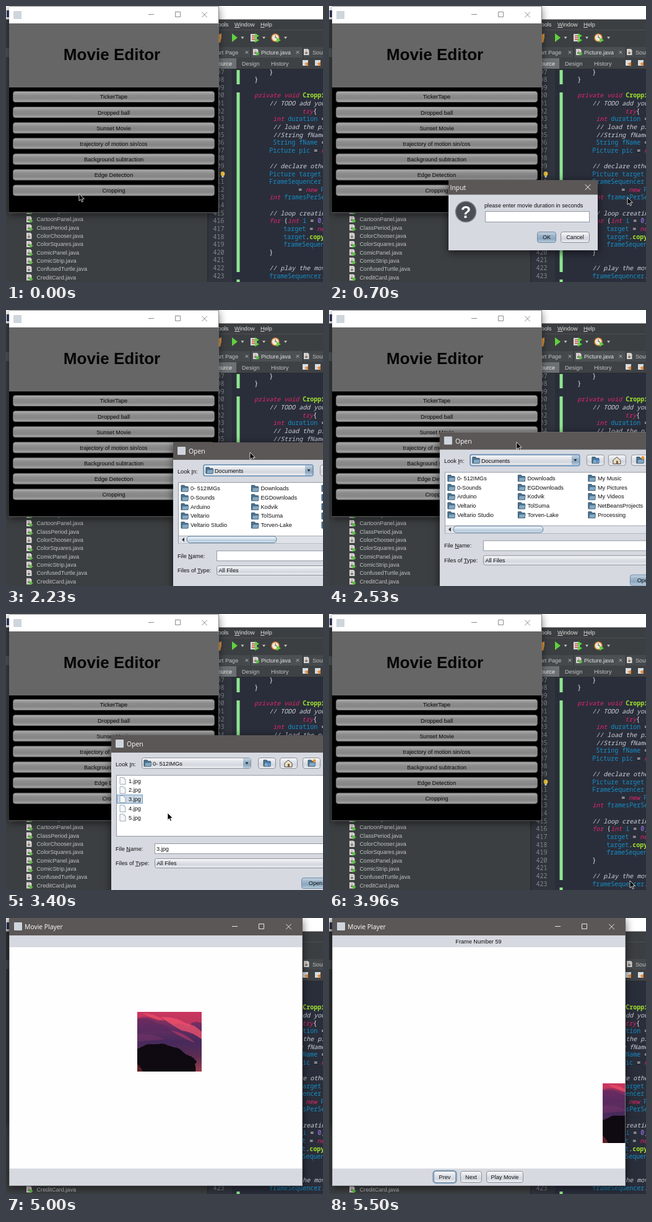
Write an HTML page that moves like this. It is 512x444 px and loops after 5.7 s.

```html
<!DOCTYPE html>
<html lang="en">
<head>
<meta charset="utf-8">
<title>Movie Editor</title>
<style>
  html, body { margin: 0; width: 100%; height: 100%; overflow: hidden; background: #3c3f41; }
  svg { display: block; width: 512px; height: 444px; }
  text { font: 9.17px "Liberation Sans", Arial, sans-serif; white-space: pre; }
  .caption { font: 10.4px "Open Sans", sans-serif; }
  .code { font: 10px "Noto Sans Mono", monospace; }
  .heading { font-size: 26.1px; font-weight: bold; }
  .help { font-size: 27px; font-weight: bold; }
  .mid { text-anchor: middle; }
  .u { text-decoration: underline; }
  .k { fill: #e8256a; font-style: italic; }
  .c { fill: #cfd2d6; font-style: italic; }
  .v { fill: #158fc6; }
  .f { fill: #a2e32c; font-weight: bold; }
  .n { fill: #a77cf0; }
  .w { fill: #ececea; }
  .shadow { filter: drop-shadow(0 3px 7px rgba(0, 0, 0, .6)); }
</style>
</head>
<body>
<svg id="stage" viewBox="0 0 512 444"></svg>
<script>
const LOOP = 5700;
const PANEL = '#d6d9e0', CAPTION = '#5b5756';

// Drawing helpers
const rect = (x, y, w, h, fill, more = '') =>
  `<rect x="${x}" y="${y}" width="${w}" height="${h}" fill="${fill}" ${more}/>`;
const path = (d, fill, more = '') => `<path d="${d}" fill="${fill}" ${more}/>`;
const line = (d, color, width = 1) => path(d, 'none', `stroke="${color}" stroke-width="${width}"`);
const mnemonic = s => s.replace(/_(.)/, '<tspan class="u">$1</tspan>');
const text = (x, y, s, fill = '#111', cls = '') =>
  `<text x="${x}" y="${y}" fill="${fill}" class="${cls}">${mnemonic(s)}</text>`;
const group = (id, body, more = '') => `<g id="${id}" ${more}>${body}</g>`;
const logo = (x, y) => rect(x, y, 13, 13, '#cfd5dc', 'rx="1"');
const button = (x, y, w, h, label, fill = 'url(#light)', color = '#111', edge = '#8b9098') =>
  rect(x + .5, y + .5, w - 1, h - 1, fill, `rx="3.5" stroke="${edge}"`) +
  text(x + w / 2, y + h / 2 + 3.4, label, color, 'mid');
const field = (x, y, w, h) => rect(x + .5, y + .5, w - 1, h - 1, '#fff', 'stroke="#9499a2"');
const cross = (x, y, r, color) => line(`M${x - r} ${y - r}l${2 * r} ${2 * r}m0 ${-2 * r}l${-2 * r} ${2 * r}`, color);
const controls = (xs, color) =>
  line(`M${xs[0] - 4.5} 13.5h9M${xs[1] - 4} 9.5h8v8h-8z`, color) + cross(xs[2], 14, 4.3, color);
const down = (x, y, color) => path(`M${x - 2.5} ${y - 1.5}h5l-2.5 3.5z`, color);
const folder = (x, y) =>
  path(`M${x} ${y}h5l1.5 2h4.5v8h-11z`, '#4b7391', 'stroke="#2b4a62" stroke-width=".9"') +
  path(`M${x + 2} ${y + 4}h10l-1.5 6h-9.5z`, '#86a9c2', 'stroke="#3f627c" stroke-width=".6"');
const page = (x, y) =>
  path(`M${x} ${y}h6l3 3v8h-9z`, '#f4f7fa', 'stroke="#8493a3" stroke-width=".8"') +
  path(`M${x + 6} ${y}v3h3z`, '#b9c8d6');
const source = (x, y, runs) =>
  path(`M${x} ${y}h6.5l2 2v8h-8.5z`, '#d3d6d8') +
  path(`M${x + 2} ${y + 5}h4v3h-4z`, '#8d7a6c') + line(`M${x + 4} ${y + 1.5}v3`, '#d98b45') +
  (runs ? path(`M${x + 5} ${y + 4.5}l6 3.3-6 3.3z`, '#57c33a') : '');

const gradient = (id, ...stops) =>
  `<linearGradient id="${id}" x2="0" y2="1">` +
  stops.map((c, i) => `<stop offset="${i / (stops.length - 1)}" stop-color="${c}"/>`).join('') +
  '</linearGradient>';

function defs() {
  return '<defs>' +
    gradient('steel', '#b0b0b0', '#8d8d8d', '#858585', '#a8a8a8') +
    gradient('light', '#fbfbfc', '#e2e5ea', '#d3d7de', '#f0f2f5') +
    gradient('blue', '#c8d6e3', '#9db5ca', '#8ba7bf', '#bdd0df') +
    gradient('thumb', '#f2f6fa', '#dbe6ef', '#b4cadb', '#e4eef5') +
    gradient('pressed', '#3f5e7d', '#4b6f93', '#5d83a6', '#7a9cb9') +
    gradient('sky', '#a8305c', '#6a2e62', '#462a5c', '#5c2c52', '#96404e') +
    '<clipPath id="canvas"><path d="M5 47h474v356H5z"/></clipPath>' +
    '<clipPath id="photo"><path d="M0 0h104v96H0z"/></clipPath></defs>';
}

function codeArea() {
  const top = 109.6, pitch = 12.615;
  const lines = [
    [0, 426, 'w}'],
    [1, 402, 'w}'],
    [3, 402, 'kprivate void ', 'fCropping'],
    [4, 426, 'c// TODO add your'],
    [5, 479, 'ktry', 'w{'],
    [6, 432, 'kint ', 'vduration ', 'w='],
    [7, 432, 'c// load the picture'],
    [8, 432, 'c//String fName'],
    [9, 432, 'vString fName ', 'w='],
    [10, 426, 'vPicture pic ', 'w= ', 'knew'],
    [12, 426, 'c// declare other'],
    [13, 426, 'vPicture target'],
    [14, 426, 'vFrameSequencer'],
    [15, 473, 'w= ', 'knew ', 'vF'],
    [16, 426, 'kint ', 'vframesPerSec'],
    [18, 426, 'c// loop creating'],
    [19, 426, 'kfor ', 'w(', 'kint ', 'vi ', 'w= ', 'n0', 'w;'],
    [20, 449, 'vtarget ', 'w= ', 'knew'],
    [21, 449, 'vtarget', 'w.', 'fcopy'],
    [22, 449, 'vframeSequencer'],
    [23, 426, 'w}'],
    [25, 426, 'c// play the movie'],
    [26, 426, 'vframeSequencer', 'w.']
  ];
  let out = rect(327, 102, 185, 342, '#2a2e3b') + rect(327, 102, 38, 342, '#30343d');
  for (let i = 0; i < 27; i++) out += text(334.5, top + i * pitch, `${397 + i}`, '#83868c', 'code');
  for (const [row, x, ...parts] of lines) {
    const spans = parts.map(p => `<tspan class="${p[0]}">${p.slice(1)}</tspan>`).join('');
    out += text(x - .8, top + row * pitch, spans, '#fff', 'code');
  }
  return out + rect(372.5, 103, 5, 23, '#8fe78f') + rect(372.5, 139, 5, 289, '#8fe78f') +
    rect(372.5, 440, 5, 4, '#8fe78f') +
    `<circle cx="350" cy="270" r="3.4" fill="#f4c93c"/>` + rect(348.5, 273, 3, 3, '#c9ced4');
}

function ide() {
  const grey = '#c0c2c4';
  const files = ['Cartoon', 'CartoonPanel', 'ClassPeriod', 'ColorChooser', 'ColorSquares',
    'ComicPanel', 'ComicStrip', 'ConfusedTurtle', 'CreditCard'];
  let out = rect(0, 0, 512, 444, '#3c3f41') + rect(0, 0, 512, 21.5, '#fff') +
    rect(1, 7, 4, 11, '#39406b') + rect(0, 68, 5, 14, '#55595c');
  files.forEach((name, i) => {
    const y = 329.6 + i * 13.35;
    out += source(33, y - 5, i !== 3 && i !== 7) + text(49.5, y + 3.2, name + '.java', grey);
  });
  out += rect(325, 66, 2, 378, '#2b2d2f') +
    text(338, 33, 'Tools', '#ddd') + text(369, 33, '_Window', '#ddd') + text(411, 33, '_Help', '#ddd') +
    line('M327 38.5h185', '#4b4e50') +
    path('M343 46l5-2v7l-2 8h-3z', '#d9913f') +
    path('M365 44l9 7-9 7z', '#5fd23f') +
    rect(395, 45, 10, 12, '#d8dcdf') + line('M397 48h6M397 51h5M397 54h6', '#cf4a3e', 1.4) +
    path('M402 44l7 4-7 4zM402 51l7 4-7 4z', '#5fd23f') +
    '<circle cx="435" cy="51" r="6" fill="#f1e7d8" stroke="#d98632" stroke-width="1.6"/>' +
    line('M435 47v4h3', '#555') + path('M437 51l7 4-7 4z', '#5fd23f') +
    [382, 416.5, 451.5].map(x => down(x, 51, '#c6c8ca')).join('') +
    rect(327, 66, 185, 17, '#45494b') + rect(395, 66, 84, 17, '#4c5053') + line('M395.5 66v17M479.5 66v17', '#2f3133') +
    text(332, 78, 'Start Page', grey) + cross(389, 74.5, 2.3, grey) +
    source(399, 69, true) + text(412, 78, 'Picture.java', '#e2e4e5') + cross(471, 74.5, 2.3, grey) +
    source(481, 69, false) + text(495, 78, 'Source.java', grey) +
    rect(327, 83, 185, 19, '#3f4244') + rect(333, 84, 39, 17, '#6c7073') +
    text(336, 96, 'Source', '#eee') + text(381, 96, 'Design', grey) + text(428, 96, 'History', grey) +
    [479, 499].map(x => rect(x, 87, 9, 9, '#d9dde0') + path(`M${x + 9} ${90}l-6 3 6 4z`, '#e08a3c')).join('') +
    line('M327 101.5h185', '#27292b');
  return out + codeArea();
}

function mainWindow() {
  const items = ['TickerTape', 'Dropped ball', 'Sunset Movie', 'trajectory of motion sin/cos',
    'Background subtraction', 'Edge Detection', 'Cropping'];
  return rect(5, 0, 338, 332, '#000', 'class="shadow"') + rect(5, 0, 338, 28, '#fff') +
    logo(12, 8) + controls([234.5, 277.5, 320.5], '#8c8c8c') +
    rect(5, 28, 338, 103, '#666') + text(171, 87, 'Movie Editor', '#050505', 'heading mid') +
    items.map((s, i) => button(11, 137 + i * 25.1, 326, 18, s, 'url(#steel)', '#0a0a0a', '#6a6a6a')).join('') +
    line('M5 .5h338.5v332H4.5', '#777', .8);
}

function inputDialog() {
  return rect(193, 280, 241, 113, PANEL, 'class="shadow"') + rect(193, 280, 241, 23.5, CAPTION) +
    text(195.5, 296, 'Input', '#fff', 'caption') + cross(418, 291.5, 4.3, '#fff') +
    '<circle cx="221" cy="331" r="16.5" fill="#4a4f56" stroke="#7d838b" stroke-width="1.5"/>' +
    text(221, 341, '?', '#fff', 'help mid') +
    text(251, 324, 'please enter movie duration in seconds') + field(252, 330, 169, 18) +
    group('typed', text(255, 343, '2')) +
    button(336, 363, 31, 18, 'OK', 'url(#blue)', '#111', '#6f8aa5') +
    group('okDown', button(336, 363, 31, 18, 'OK', 'url(#pressed)', '#e9f1f8', '#2f4a66')) +
    button(374, 363, 47, 18, 'Cancel');
}

// Drawn with its corner at 0,0
function openDialog() {
  const columns = [
    ['0- 512IMGs', '0-Sounds', 'Arduino', 'Veltario', 'Veltario Studio'],
    ['Downloads', 'EGDownloads', 'Kodvik', 'TolSuma', 'Torven-Lake'],
    ['My Music', 'My Pictures', 'My Videos', 'NetBeansProjects', 'Processing']
  ];
  const row = i => 74 + i * 14.75;
  const pick = (y, w) => rect(9.5, y - 7, w, 13.5, '#cbd9e6', 'stroke="#6f97c0"');
  const folders = columns.map((names, c) => names.map((s, i) =>
    folder(13 + c * 113.5, row(i) - 5) + text(28 + c * 113.5, row(i) + 3.2, s)).join('')).join('');
  const files = [1, 2, 3, 4, 5].map((n, i) => page(14, row(i) - 6) + text(28, row(i) + 2.6, n + '.jpg')).join('');
  return rect(0, 0, 406, 256, PANEL, 'class="shadow"') + rect(0, 0, 406, 28, CAPTION) +
    logo(7, 7) + text(25, 18, 'Open', '#fff', 'caption') +
    text(7, 49.5, 'Look _In:') +
    rect(49.5, 36.5, 176, 17, 'url(#light)', 'rx="3" stroke="#8b9098"') +
    rect(213, 37, 12, 16, 'url(#blue)') + down(219, 45, '#222') + folder(53, 40) +
    group('focus', rect(49, 36, 177, 18, 'none', 'rx="3" stroke="#6d95bd" stroke-width="1.6"')) +
    group('docs', text(67, 49, 'Documents')) + group('imgs', text(67, 49, '0- 512IMGs')) +
    [237, 272, 309].map(x => button(x, 36, 29, 18, '')).join('') + folder(246, 40) +
    path('M254 50v-7m-2.5 2.5l2.5-3 2.5 3', 'none', 'stroke="#2e7fd0" stroke-width="1.5"') +
    path('M280 45l6-5 6 5v6h-12z', '#e9dfc5', 'stroke="#444"') + rect(285, 46, 3, 5, '#7b5a34') +
    folder(318, 40) + '<circle cx="328" cy="41" r="2.5" fill="#f0962e"/>' +
    rect(8.5, 64.5, 389, 98, '#fff', 'stroke="#9499a2"') +
    group('folderView', group('folderPick', pick(row(0), 67)) + folders +
      rect(9, 150, 388, 12.5, '#dfe2e8') + line('M9 150.5h388', '#a6abb3') +
      rect(22, 151, 145, 10.5, 'url(#thumb)', 'rx="5" stroke="#5d7f9f"') + path('M18 153v7l-4-3.5z', '#333')) +
    group('fileView', group('filePick', pick(row(2) - .5, 41)) + files) +
    text(7, 185.5, 'File _Name:') + field(70, 174, 328, 17) + group('fileName', text(73, 185.5, '3.jpg')) +
    text(7, 209, 'Files of _Type:') + rect(70.5, 198.5, 327, 15, 'url(#light)', 'rx="3" stroke="#8b9098"') +
    text(73.5, 209.3, 'All Files') +
    button(307, 229, 46, 18, 'Open', 'url(#blue)', '#111', '#6f8aa5') +
    group('openDown', button(307, 229, 46, 18, 'Open', 'url(#pressed)', '#e9f1f8', '#2f4a66'));
}

function picture() {
  let leaves = '';
  for (let i = 0; i < 26; i++) {
    const x = i * 3.7, y = 52 + ((x - 32) / 11.5) ** 2 * .95;
    leaves += `<circle cx="${x}" cy="${y + 2}" r="${2.6 + Math.sin(i * 5.3)}" fill="#0f0a12"/>`;
  }
  const cloud = (d, color, o) => path(d, color, `opacity="${o}"`);
  return group('photoArt', rect(0, 0, 104, 96, 'url(#sky)') +
    cloud('M0 0H104V18Q90 12 82 24Q70 16 58 20Q46 10 34 14Q18 4 0 10Z', '#d93a5e', .7) +
    cloud('M0 12Q18 8 32 18Q48 20 58 32Q36 28 0 34Z', '#54285f', .55) +
    cloud('M38 8Q62 8 78 18Q92 20 104 32V44Q88 32 72 30Q56 22 38 8Z', '#f2526c', .75) +
    cloud('M8 2Q28 2 44 14Q28 14 8 2Z', '#f2526c', .6) +
    cloud('M54 30Q74 32 94 50Q76 44 54 30Z', '#c83d66', .55) +
    cloud('M0 36Q24 34 44 44Q22 46 0 48Z', '#7c3468', .5) +
    path('M0 60Q14 51 34 52Q62 53 82 71Q97 82 94 96H0Z', '#0f0a12') + leaves +
    path('M0 84q5 4 9 12H0z', '#5a2026'), 'clip-path="url(#photo)"');
}

function player() {
  return rect(5, 0, 474, 431, PANEL, 'class="shadow"') + rect(5, 0, 474, 28, CAPTION) +
    logo(13, 7) + text(30, 18, 'Movie Player', '#fff', 'caption') + controls([369.5, 412.5, 456.5], '#e6e5e4') +
    rect(5, 47, 474, 356, '#fefefe') +
    `<g clip-path="url(#canvas)">${group('photoPos', picture())}</g>` +
    group('done', text(241.5, 41.3, 'Frame Number 59', '#111', 'mid') +
      rect(168, 406.5, 38, 20, 'none', 'rx="5" stroke="#6d95bd" stroke-width="1.5"') +
      button(169, 407, 36, 19, 'Prev') + button(212, 407, 35, 19, 'Next') + button(254, 407, 60, 19, 'Play Movie')) +
    line('M5.5 28v402.5h473v-402.5', '#8f9196', .7);
}

const stage = document.getElementById('stage');
stage.innerHTML = defs() + ide() + group('main', mainWindow()) + group('input', inputDialog()) +
  group('open', openDialog()) + group('player', player()) +
  group('cursor', path('M0 0V11.5L2.7 9 4.5 13.2 6.4 12.4 4.7 8.3H8.3Z', '#000', 'stroke="#fff" stroke-width=".8"'));

const el = {};
stage.querySelectorAll('g[id]').forEach(g => el[g.id] = g);

// Keys are [time, ...values], joined by straight lines
function track(keys, t) {
  const i = keys.findIndex(k => k[0] > t);
  if (i === 0) return keys[0].slice(1);
  if (i < 0) return keys[keys.length - 1].slice(1);
  const a = keys[i - 1], b = keys[i], p = (t - a[0]) / (b[0] - a[0]);
  return a.slice(1).map((v, j) => v + (b[j + 1] - v) * p);
}

const pointer = [
  [30, 118, 302], [130, 471, 326], [470, 471, 326], [660, 503, 312], [830, 414, 295],
  [1010, 414, 295], [1230, 245, 336], [1320, 245, 336], [1530, 350, 372],
  [2140, 350, 372], [2230, 394, 229], [2260, 394, 229], [2560, 294, 211], [2590, 294, 211],
  [2730, 228, 262], [3020, 228, 262], [3200, 206, 294], [3260, 206, 294],
  [3400, 261, 320], [3566, 470, 411], [3600, 486, 429]
];
const drag = [[2260, 270, 213], [2560, 170, 195]];
const inputFade = [[466, 0], [700, 1], [1600, 1], [1700, 0]];
const openFade = [[1700, 0], [1830, 1], [3630, 1], [3766, 0]];

const show = (id, on) => el[id].style.display = on ? '' : 'none';
const move = (id, x, y) => el[id].setAttribute('transform', `translate(${x} ${y})`);

function fade(id, amount, x, y, cx, cy) {
  const s = .9 + .1 * amount;
  show(id, amount > 0);
  el[id].setAttribute('opacity', amount);
  el[id].setAttribute('transform', `translate(${x + cx * (1 - s)} ${y + cy * (1 - s)}) scale(${s})`);
}

function draw(t) {
  fade('input', track(inputFade, t)[0], 0, 0, 313, 336);
  show('typed', t >= 1290);
  show('okDown', t >= 1560);

  fade('open', track(openFade, t)[0], ...track(drag, t), 203, 128);
  const inside = t >= 3000, picked = t >= 3230;
  show('focus', t < 2760);
  show('docs', !inside);
  show('folderView', !inside);
  show('folderPick', t >= 2760);
  show('imgs', inside);
  show('fileView', inside);
  show('filePick', picked);
  show('fileName', picked);
  show('openDown', t >= 3630);

  show('player', t >= 4600);
  const step = Math.max(0, Math.min(43, Math.round((t - 4600) / 20)));
  move('photoPos', 12 + step * 10, 51 + step * 5);
  show('done', t >= 5500);

  show('cursor', t < 4160);
  move('cursor', ...track(pointer, t));
}

const start = performance.now();
function tick() {
  const ms = Math.floor(((performance.now() - start) % LOOP) / 10) * 10;
  draw((Math.ceil((ms + 10) * 3 / 100) - 1) * 100 / 3);
  requestAnimationFrame(tick);
}
tick();
</script>
</body>
</html>
```
